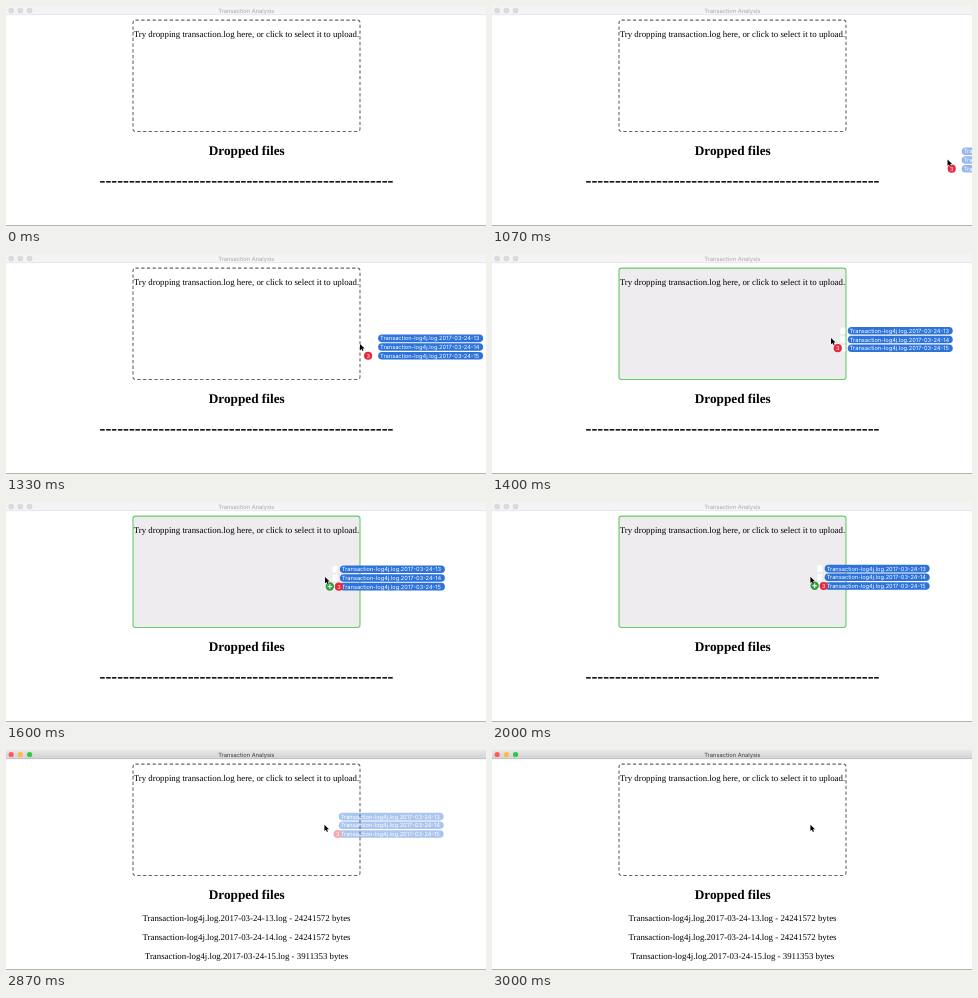
Animation of 480x220 px, one loop 3.67 s. Source, as an HTML page:

```html
<!DOCTYPE html>
<html lang="en">
<head>
<meta charset="utf-8">
<title>Transaction Analysis</title>
<style>
  html, body { margin: 0; width: 100%; height: 100%; overflow: hidden; background: #fff; }
  svg { display: block; width: 480px; height: 220px; }
  text { text-rendering: geometricPrecision; }
  .page text { font: 8.84px "Liberation Serif", "Times New Roman", serif; text-anchor: middle; }
  .page .h1 { font-size: 17.66px; font-weight: bold; }
  .page .h2 { font-size: 13.25px; font-weight: bold; }
  .ui { font-family: Inter, Roboto, sans-serif; }
</style>
</head>
<body>
<svg viewBox="0 0 480 220">
  <defs>
    <linearGradient id="bar" x2="0" y2="1">
      <stop stop-color="#e9e7e9"/>
      <stop offset="1" stop-color="#d2d0d2"/>
    </linearGradient>
  </defs>
  <rect width="480" height="220" fill="#fff"/>
  <rect y="219" width="480" height="1" fill="#b4b4b4"/>

  <g class="ui">
    <rect id="titleBar" width="480" height="9"/>
    <rect id="barEdge" y="8.5" width="480" height=".6"/>
    <g id="lights"></g>
    <text id="title" x="240.3" y="6.5" font-size="5.75" text-anchor="middle">Transaction Analysis</text>
  </g>

  <g class="page">
    <rect id="zone" x="127" y="14.1" width="227" height="111.4" rx="2.5" stroke-width="1.1"/>
    <text x="240.4" y="31.2">Try dropping transaction.log here, or click to select it to upload.</text>
    <text class="h2" x="240.7" y="148.8">Dropped files</text>
    <text class="h1" id="rule" x="240.5" y="180"></text>
    <g id="list"></g>
  </g>

  <g class="ui">
    <g id="drag">
      <g id="pills"></g>
      <g id="plus">
        <circle cx="4.2" cy="9" r="4.2" fill="#2f9e3a"/>
        <path d="M1.9 9h4.6M4.2 6.7v4.6" stroke="#fff" stroke-width="1.1"/>
      </g>
      <g id="badge">
        <circle r="4.1" fill="#e8283c"/>
        <text y="2" font-size="5.6" fill="#fff" text-anchor="middle">3</text>
      </g>
    </g>
    <path id="cursor" d="M0 0V6.2L1.5 4.9 2.5 7.1 3.5 6.7 2.6 4.5H4.6Z"
          fill="#000" stroke="#fff" stroke-width=".6" paint-order="stroke"/>
  </g>
</svg>
<script>
const LOOP = 3670;
const HOVER = 1400, PLUS = 1460, ACTIVE = 2330, RELEASE = 2400, DROP = 2870, DONE = 3000;
const LAG = 0.17;

// time, pointer x, pointer y
const PATH = [
  [1070, 455.5, 153.5], [1130, 432, 140], [1200, 403, 121], [1260, 377, 105],
  [1330, 354, 90], [1400, 339, 84], [1460, 329, 80], [1530, 323, 77.5],
  [1600, 319, 75], [1670, 318.8, 74.8], [2000, 318.4, 74.8]
];
const LIGHTS = ['#fc5b57', '#fdbc40', '#33c748'];
const FILES = [[13, 24241572], [14, 24241572], [15, 3911353]];

const $ = id => document.getElementById(id);

function add(parent, tag, attrs, text = '') {
  const el = document.createElementNS('http://www.w3.org/2000/svg', tag);
  for (const name in attrs) el.setAttribute(name, attrs[name]);
  el.textContent = text;
  return parent.appendChild(el);
}

const set = (id, attrs) => {
  for (const name in attrs) $(id).setAttribute(name, attrs[name]);
};
const move = (id, x, y) => set(id, { transform: `translate(${x} ${y})` });
const fade = (id, opacity) => set(id, { opacity: Number(opacity) });

const lights = LIGHTS.map((_, i) =>
  add($('lights'), 'circle', { cx: 5.2 + 9.2 * i, cy: 4.5, r: 2.6, 'stroke-width': 0.4 }));

FILES.forEach(([day, size], i) => {
  const name = `Transaction-log4j.log.2017-03-24-${day}`;
  const y = -8.2 + 8.7 * i;
  add($('list'), 'text', { x: 240.5, y: 170.9 + 19.1 * i }, `${name}.log - ${size} bytes`);
  add($('pills'), 'rect', { x: 6.8, y: y - 3.2, width: 5, height: 6.4, rx: 0.5, fill: '#fff' });
  add($('pills'), 'rect', { x: 14.2, y: y - 3.8, width: 105, height: 7.6, rx: 3.8, fill: '#2d73da' });
  add($('pills'), 'text', { x: 16.2, y: y + 2, 'font-size': 5.7, fill: '#fff' }, name);
});

$('rule').textContent = '-'.repeat(50);

function drawWindow(active) {
  set('titleBar', { fill: active ? 'url(#bar)' : '#f6f3f6' });
  set('barEdge', { fill: active ? '#b8b6b8' : '#dedbde' });
  set('title', { fill: active ? '#3c3c3c' : '#a9a7a9' });
  lights.forEach((el, i) => {
    el.setAttribute('fill', active ? LIGHTS[i] : '#dddadd');
    el.setAttribute('stroke', active ? 'none' : '#cfcccf');
  });
}

function drawZone(hover) {
  set('zone', hover
    ? { fill: '#eeecee', stroke: '#66cc66', 'stroke-dasharray': 'none' }
    : { fill: '#fff', stroke: '#666', 'stroke-dasharray': '3.3 2.4' });
}

function drawDrag(t) {
  const i = PATH.findLastIndex(p => p[0] <= t);
  fade('cursor', i >= 0);
  fade('drag', i >= 0 && t < DONE ? (t < DROP ? 1 : 0.4) : 0);
  if (i < 0) return;

  const [, x, y] = PATH[i];
  const [, px, py] = PATH[Math.max(0, i - 1)];
  move('cursor', x, y);
  move('drag', x + (px - x) * LAG, y + (py - y) * LAG);
  fade('pills', [0.5, 0.75, 0.9][i] ?? 1);
  fade('plus', t >= PLUS && t < RELEASE ? (t < ACTIVE ? 1 : 0.5) : 0);
  move('badge', t >= PLUS ? 13.2 : 4.2, 9.2);
}

function draw(t) {
  drawWindow(t >= ACTIVE);
  drawZone(t >= HOVER && t < DROP);
  fade('rule', t < DROP);
  fade('list', t >= DROP);
  drawDrag(t);
}

const start = performance.now();
function tick() {
  draw((performance.now() - start) % LOOP);
  requestAnimationFrame(tick);
}
tick();
</script>
</body>
</html>
```
